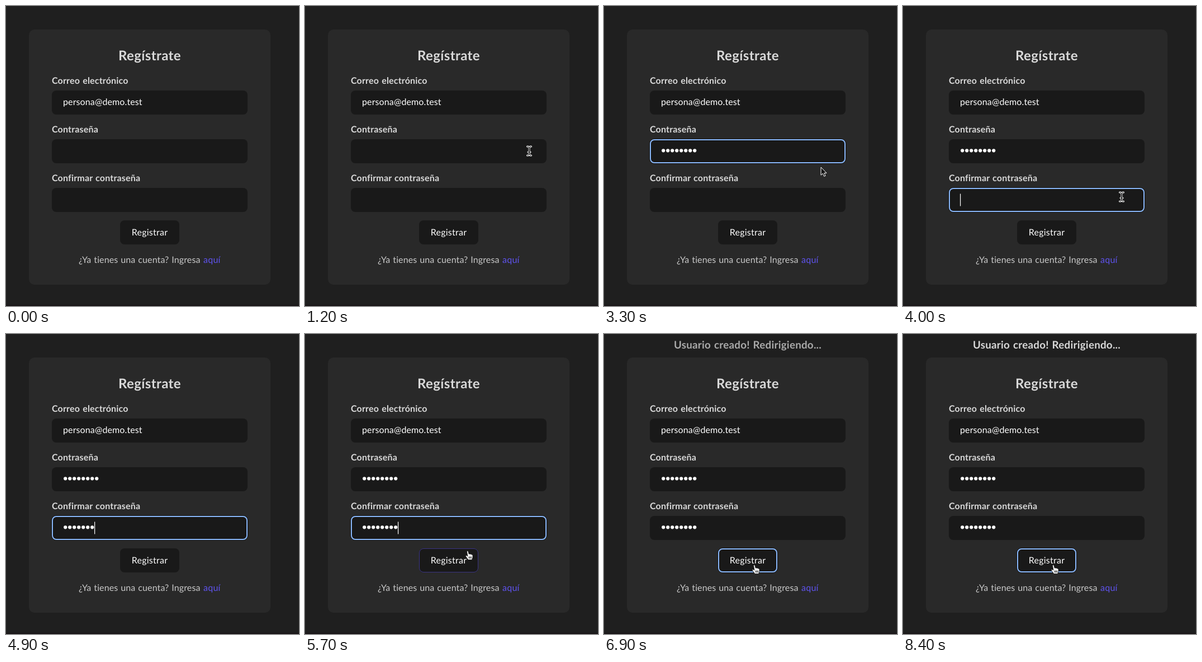
An HTML page for the animation above (8.7 s loop, 524x536 px).

```html
<!DOCTYPE html>
<html lang="es">
<head>
<meta charset="utf-8">
<title>Regístrate</title>
<style>
  html, body { margin: 0; width: 100%; height: 100%; overflow: hidden; background: #1f1f1f; }
  svg { display: block; width: 524px; height: 536px; }
  text {
    font: 16px Lato, "Open Sans", sans-serif;
    fill: #fff;
    letter-spacing: .12px;
    word-spacing: 1px;
    text-rendering: geometricPrecision;
  }
  .title, .label, .toast { font-weight: 700; fill: #d9d9d9; letter-spacing: .18px; }
  .title { font-size: 24px; letter-spacing: .4px; }
  .toast { font-size: 18.72px; letter-spacing: .28px; }
  .action { letter-spacing: .25px; }
  .middle { text-anchor: middle; }
  .note { fill: #c9c9c9; letter-spacing: .1px; word-spacing: .8px; }
  .link { fill: #5f53ee; letter-spacing: .25px; }
  .box { fill: #191919; }
  .ring { fill: none; }
  .ring .halo { stroke: #131313; stroke-width: 4; }
  .ring .glow { stroke: #8ab8fa; stroke-width: 2; }
  .hover { fill: none; stroke: #5d50ee; }
  .caret { fill: #fff; }
  .dark { fill: #111; stroke: #fff; stroke-linejoin: round; }
</style>
</head>
<body>
<svg viewBox="0 0 524 536">
  <rect width="524" height="536" fill="#1f1f1f"/>
  <rect y="534" width="524" height="2" fill="#181416"/>
  <rect x="41" y="42" width="432" height="456" rx="10" fill="#292929"/>
  <text id="toast" class="toast middle" x="257" y="26">Usuario creado! Redirigiendo...</text>
  <text class="title middle" x="257" y="97">Regístrate</text>

  <text class="label" x="82" y="139">Correo electrónico</text>
  <rect class="box" x="82" y="151" width="350" height="43" rx="8"/>
  <text x="102" y="177">persona@demo.test</text>

  <text class="label" x="82" y="226">Contraseña</text>
  <g id="password" transform="translate(82 238)"></g>

  <text class="label" x="82" y="313">Confirmar contraseña</text>
  <g id="confirm" transform="translate(82 325)"></g>

  <rect class="box" x="204" y="383" width="106" height="43" rx="8"/>
  <rect id="hover" class="hover" x="204.5" y="383.5" width="105" height="42" rx="7.5"/>
  <g id="buttonRing" transform="translate(204 383)"></g>
  <text class="action middle" x="257" y="410">Registrar</text>

  <text class="note" x="130" y="459">¿Ya tienes una cuenta? Ingresa</text>
  <text class="link" x="353" y="459">aquí</text>

  <g id="cursor">
    <path id="arrow" class="dark" d="M0 0V14.2L3.3 11.2L5.6 16.4L8 15.3L5.8 10.4H10Z"/>
    <g id="beam" fill="none" stroke-linecap="round">
      <path d="M-3.5 -8Q0 -8 0 -5V5Q0 8 -3.5 8M3.5 -8Q0 -8 0 -5V5Q0 8 3.5 8M-2 2H2" stroke="#fff" stroke-width="3"/>
      <path d="M-3.5 -8Q0 -8 0 -5V5Q0 8 -3.5 8M3.5 -8Q0 -8 0 -5V5Q0 8 3.5 8M-2 2H2" stroke="#111"/>
    </g>
    <g id="hand">
      <path fill="#fff" stroke="#111" stroke-width=".9" stroke-linejoin="round"
        d="M-1.6 .2Q-.2 -1.3 1 .5L2.2 5.2Q3.5 4.2 4.6 5.4Q6 4.6 6.8 6Q8.6 5.6 9 7.4V11L7.6 15.4H.8L-3.5 9.6Q-4.3 7.6 -2.6 7.4L-.2 9Z"/>
      <path fill="none" stroke="#111" d="M2.3 9.5V13.3M4.3 9.5V13.3M6.3 9.5V13.3"/>
    </g>
  </g>
</svg>
<script>
const LOOP = 8700, STEP = 100;
const $ = id => document.getElementById(id);
const show = (el, on) => { el.style.display = on ? '' : 'none'; };
const within = (t, from, to) => t >= from && t < to;
const clamp = v => Math.max(0, Math.min(1, v));

// Pointer hot spot: time, x, y
const path = [
  [700, 514, 298], [800, 468, 284], [900, 434, 271], [1000, 413, 264], [1200, 401, 259],
  [3100, 401, 259], [3200, 398, 267], [3300, 388, 288], [3400, 386, 309], [3600, 390, 335],
  [3700, 391, 341], [5200, 391, 341], [5300, 362, 349], [5500, 327, 372], [5600, 305, 384],
  [5700, 291, 388], [5900, 276, 405], [6100, 269, 413]
];
const pointerShown = [[700, 2200], [3200, 4200], [5300, LOOP]];

const fields = [
  { el: $('password'), focus: [1400, 3800], blinks: [[1900, 2200], [3200, 3800]],
    keys: [2300, 2400, 2500, 2800, 2800, 2900, 3000, 3000] },
  { el: $('confirm'), focus: [3800, 6200], blinks: [[5300, 5700]],
    keys: [4200, 4300, 4400, 4500, 4600, 4800, 4900, 5000] }
];

// Two-tone focus ring around a box
function ring(width, height) {
  const edge = tone =>
    `<rect class="${tone}" x="1" y="1" width="${width - 2}" height="${height - 2}" rx="7"/>`;
  return `<g class="ring">${edge('halo')}${edge('glow')}</g>`;
}

$('buttonRing').innerHTML = ring(106, 43);
for (const f of fields) {
  const dots = f.keys.map((_, i) => `<circle cx="${24.2 + 8 * i}" cy="20.3" r="3.1" fill="#fff"/>`);
  f.el.innerHTML = `<rect class="box" width="350" height="43" rx="8"/>${ring(350, 43)}
    ${dots.join('')}<rect class="caret" y="10.5" width="1.2" height="22"/>`;
  f.dots = f.el.querySelectorAll('circle');
  f.ring = f.el.querySelector('.ring');
  f.caret = f.el.querySelector('.caret');
}

function pointerAt(t) {
  const next = path.findIndex(p => p[0] > t);
  if (next < 0) return path.at(-1).slice(1);
  if (next === 0) return path[0].slice(1);
  const [t0, x0, y0] = path[next - 1], [t1, x1, y1] = path[next];
  const k = (t - t0) / (t1 - t0);
  return [x0 + (x1 - x0) * k, y0 + (y1 - y0) * k];
}

function shapeAt(x, y) {
  const inRows = (top, bottom) => within(y, top, bottom);
  if (within(x, 82, 432) && (inRows(238, 281) || inRows(325, 368))) return 'beam';
  if (within(x, 204, 310) && inRows(383, 426)) return 'hand';
  return 'arrow';
}

function render(t) {
  for (const f of fields) {
    const focused = within(t, ...f.focus);
    const typed = f.keys.filter(k => k <= t).length;
    f.dots.forEach((dot, i) => show(dot, i < typed));
    show(f.ring, focused);
    show(f.caret, focused && !f.blinks.some(b => within(t, ...b)));
    f.caret.setAttribute('x', 20 + 8 * typed);
  }

  const [x, y] = pointerAt(t), shape = shapeAt(x, y);
  show($('cursor'), pointerShown.some(w => within(t, ...w)));
  $('cursor').setAttribute('transform', `translate(${x} ${y})`);
  for (const id of ['arrow', 'beam', 'hand']) show($(id), id === shape);

  $('hover').style.opacity = t < 6200 ? clamp((t - 5550) / 300) : 0;
  $('buttonRing').style.opacity = clamp((t - 6100) / 200);
  $('toast').style.opacity = clamp((t - 6600) / 400);
}

const start = performance.now();
function tick() {
  const t = (performance.now() - start) % LOOP;
  render(Math.floor(t / STEP) * STEP);
  requestAnimationFrame(tick);
}
tick();
</script>
</body>
</html>
```
